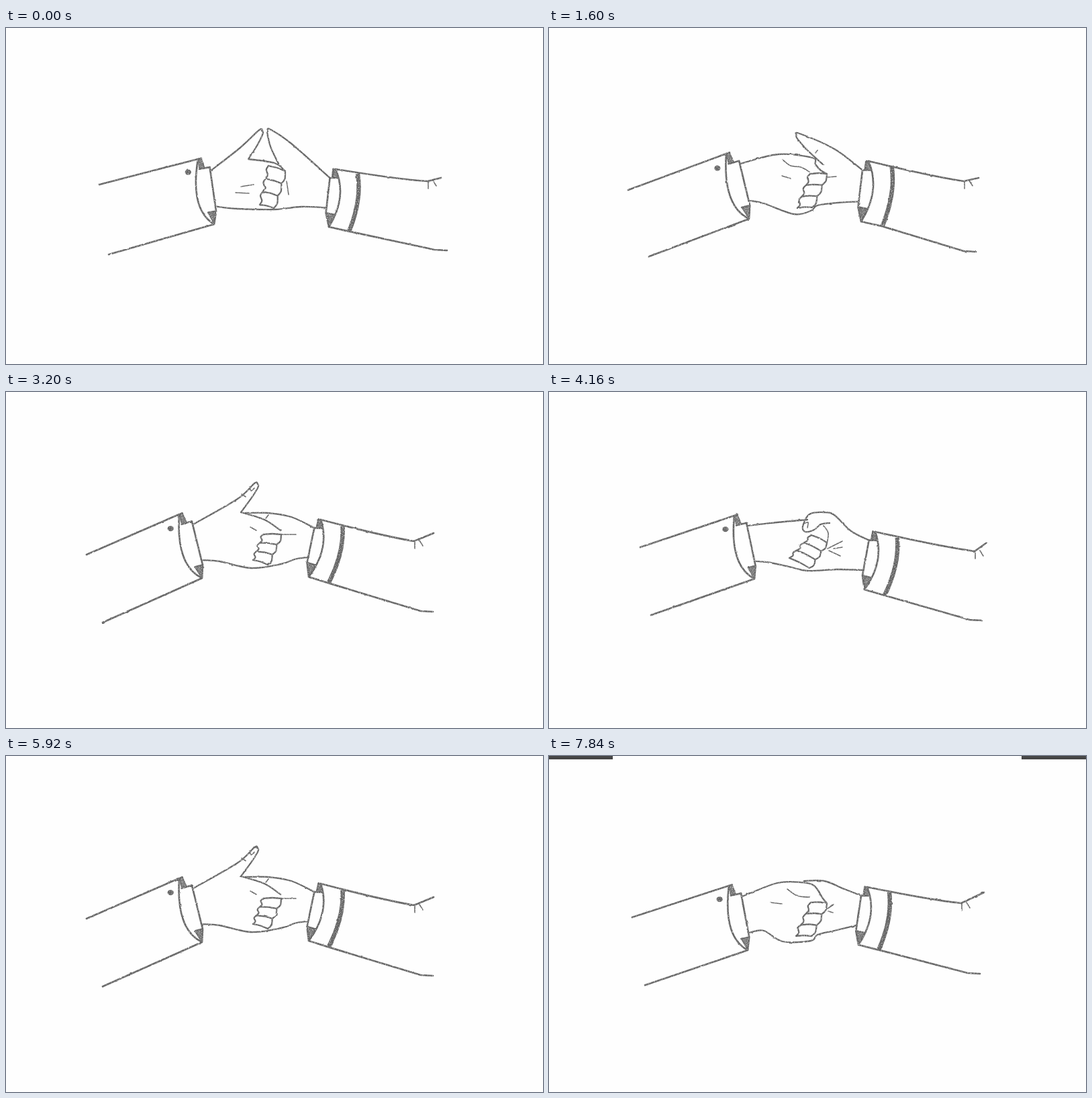
An HTML page for the animation above (8 s loop, 800 px wide and 500 px high).

```html
<!DOCTYPE html>
<html lang="en">
<head>
<meta charset="utf-8">
<title>Thumb wrestling</title>
<style>
  html, body { margin: 0; width: 100%; height: 100%; overflow: hidden; background: #fefefe; }
  svg { display: block; width: 100vw; height: 100vh; }
  path { fill: none; stroke: #666; stroke-linecap: round; stroke-linejoin: round; }
  #arms { stroke-width: 2.7; }
  #hands { stroke-width: 2.3; }
  #fine { stroke-width: 1.6; }
  #band { stroke-width: 6.5; stroke-linecap: butt; }
  #shade { fill: #7a7a7a; stroke-width: 1.4; }
  #button { fill: #666; }
  #bars { fill: #464646; animation: bars 8s step-end infinite; }
  @keyframes bars { 0% { visibility: hidden } 98% { visibility: visible } 100% { visibility: hidden } }
</style>
</head>
<body>
<svg viewBox="0 0 800 500">
  <filter id="pencil" filterUnits="userSpaceOnUse" x="0" y="0" width="800" height="500" color-interpolation-filters="sRGB">
    <feTurbulence id="rough" type="fractalNoise" baseFrequency=".12" numOctaves="2" result="n"/>
    <feDisplacementMap in="SourceGraphic" in2="n" scale="2" xChannelSelector="R" yChannelSelector="G"/>
    <feGaussianBlur stdDeviation=".45" result="line"/>
    <feTurbulence type="fractalNoise" baseFrequency=".6" numOctaves="2"/>
    <feColorMatrix values="0 0 0 0 0  0 0 0 0 0  0 0 0 0 0  0 0 0 2 0" result="grain"/>
    <feComposite in="line" in2="grain" operator="in"/>
  </filter>
  <g filter="url(#pencil)">
    <path id="shade"/>
    <path id="band"/>
    <path id="arms"/>
    <path id="hands"/>
    <path id="fine"/>
    <ellipse id="button" rx="4.6" ry="4"/>
  </g>
  <g id="bars"><rect width="95" height="5"/><rect x="704" width="96" height="5"/></g>
</svg>
<script>
const STEP = 160, COUNT = 50;
const $ = id => document.getElementById(id);
const points = s => s.split(' ').map(p => p.split(',').map(Number));

// arms:  left far, top, low, farLow; right cuff, base, elbow, tip, end
// up:    hands whose thumb is raised; their points are knuckle, tip, web, then the index finger
// fist:  corners of the folded fingers
const pose = (up, arms, left, right, palm, fist, marks) => ({
  up, arms: points(arms), left: points(left), right: points(right),
  palm: points(palm), fist: points(fist), marks: marks.split('/').map(points)
});

const POSES = {
  level: pose('LR', '139,233 286,195 310,292 153,337 491,210 481,296 628,228 648,223 657,331',
    '349,178 377,152 361,195 400,201 416,213', '425,172 394,151 406,202',
    '345,269 400,270 440,266', '391,205 416,213 399,268 378,263',
    '350,236 369,233/342,245 362,246/418,228 421,248'),
  duck: pose('R', '118,241 264,187 298,284 149,340 476,198 465,288 618,228 640,223 636,333',
    '341,188 392,193 397,203 405,212 414,217', '425,180 373,157 408,203',
    '320,261 365,277 390,272 400,264 430,260', '389,217 414,217 392,267 370,268',
    '348,196 360,205 375,207 388,214/347,220 360,224/415,222 428,221/397,186 400,182'),
  lure: pose('L', '120,242 258,182 292,277 144,343 469,190 451,275 608,222 637,210 636,327',
    '345,159 370,136 350,179 385,190 409,206', '357,180 390,180 425,186',
    '318,252 365,262 410,256 430,249', '383,212 410,212 390,257 368,250',
    '364,201 373,206/363,141 365,147 370,143/351,152 357,156/409,212 432,212/391,183 387,188'),
  pin: pose('', '136,231 276,184 306,278 152,332 486,208 470,294 634,237 651,225 645,340',
    '340,194 385,190', '418,195 405,197 395,205 382,208 378,200 388,182 410,179 425,183 450,207',
    '330,254 362,261 385,266 430,264', '391,213 414,224 388,262 358,247',
    '380,196 386,194 385,202/409,199 416,210 414,226/415,233 437,222/424,233 437,231/417,236 434,244'),
  spread: pose('LR', '113,233 255,174 290,265 131,337 480,185 458,269 615,226 645,211 626,331',
    '325,160 342,123 344,167 393,181 405,192', '425,165 380,137 406,190',
    '320,241 378,248 410,243', '370,192 404,200 379,247 358,234',
    '340,128 339,135 343,135/306,227 316,232/389,158 394,154/402,203 420,202/410,186 425,202'),
  lift: pose('R', '123,233 261,164 302,260 166,325 479,182 458,264 610,223 639,217 643,336',
    '325,170 362,162 385,166 405,178 407,189', '425,150 400,121 413,188',
    '340,232 380,238 415,237', '371,177 406,191 381,237 350,221',
    '410,162 395,170/437,193 449,190/413,188 424,203/425,204 432,210/431,205 444,207'),
  clasp: pose('', '124,240 268,193 296,289 143,341 474,195 461,281 614,219 648,203 642,324',
    '340,189 375,188 395,193 408,212 414,219', '380,186 410,186 440,198',
    '320,260 348,276 390,275 400,266 425,260', '390,218 414,219 391,268 368,268',
    '355,198 370,208 388,210/330,218 347,220/415,227 424,221/416,231 423,233')
};

// step at which each pose is struck
const KEYS = [[0, 'level'], [4, 'pin'], [7, 'spread'], [10, 'duck'], [13, 'spread'], [16, 'lift'], [20, 'lure'],
  [23, 'level'], [26, 'pin'], [31, 'spread'], [34, 'duck'], [37, 'lure'], [42, 'lift'], [45, 'lure'],
  [49, 'clasp'], [50, 'level']];

const mix = (a, b, u) => [a[0] + (b[0] - a[0]) * u, a[1] + (b[1] - a[1]) * u];
const add = (p, x, y) => [p[0] + x, p[1] + y];
const fmt = p => p.map(v => v.toFixed(1)).join();
const poly = pts => 'M' + pts.map(fmt).join('L');
const quad = (a, c, b) => `M${fmt(a)}Q${fmt(c)} ${fmt(b)}`;

// Catmull-Rom curve through the points
function curve(pts) {
  let d = 'M' + fmt(pts[0]);
  for (let i = 0; i < pts.length - 1; i++) {
    const a = pts[i - 1] || pts[i], b = pts[i], c = pts[i + 1], e = pts[i + 2] || c;
    d += `C${fmt(add(b, (c[0] - a[0]) / 6, (c[1] - a[1]) / 6))} ` +
         `${fmt(add(c, (b[0] - e[0]) / 6, (b[1] - e[1]) / 6))} ${fmt(c)}`;
  }
  return d;
}

// point measured along a sleeve opening and outward from it
const frame = (a, b) => (along, out) => {
  const x = b[0] - a[0], y = b[1] - a[1];
  return [a[0] + along * x - out * y, a[1] + along * y + out * x];
};

// sleeve openings and shirt cuffs follow from the key points of both arms
function rig([far, top, low, farLow, cuff, base, elbow, tip, end]) {
  const l = frame(top, low), r = frame(cuff, base);
  return {
    far, top, low, farLow, cuff, base, elbow, tip, end, l, r,
    shirtL: [l(.15, .015), l(.16, -.142), l(.82, -.075), l(.81, .045)],
    shirtR: [r(.14, -.06), r(.16, .08), r(.77, .078), r(.78, -.07)]
  };
}

const wrists = ({ shirtL, shirtR }) => [mix(shirtL[1], shirtL[2], .5), mix(shirtR[1], shirtR[2], .5)];

// turns, scales and moves the hands so that they stay on both wrists
function follow([p, q], [P, Q]) {
  const x = q[0] - p[0], y = q[1] - p[1], X = Q[0] - P[0], Y = Q[1] - P[1], n = x * x + y * y;
  const c = (X * x + Y * y) / n, s = (Y * x - X * y) / n;
  return ([a, b]) => {
    const u = a - p[0], v = b - p[1];
    return [P[0] + u * c - v * s, P[1] + u * s + v * c];
  };
}

function thumb(base, [knuckle, tip, web, ...finger]) {
  const len = Math.hypot(tip[0] - knuckle[0], tip[1] - knuckle[1]);
  const dx = (tip[0] - knuckle[0]) / len, dy = (tip[1] - knuckle[1]) / len;
  const side = Math.sign(dx * (web[1] - tip[1]) - dy * (web[0] - tip[0])) * 8;
  const inner = add(tip, -dy * side, dx * side);
  const pad = add(mix(inner, web, .5), dx * 4, dy * 4);
  const end = add(mix(tip, inner, .5), dx * 3, dy * 3);
  return [[base, knuckle, tip, end, inner, pad, web], [web, ...finger]];
}

// three folded fingers stacked between knuckles and tips
function fist([topL, topR, lowR, lowL]) {
  const left = i => mix(topL, lowL, i / 3), right = i => mix(topR, lowR, i / 3);
  const out = [];
  for (let i = 0; i <= 3; i++) {
    const l = left(i), r = right(i);
    out.push([l, add(mix(l, r, .5), 0, -1), r]);
    if (i === 3) break;
    out.push([r, add(mix(r, right(i + 1), .55), 2.5, 1.5), right(i + 1)]);
    out.push([l, add(mix(l, left(i + 1), .3), -2, 0), add(mix(l, left(i + 1), .7), 2, 0), left(i + 1)]);
  }
  return out;
}

function drawArms(k) {
  const { far, top, low, farLow, cuff, base, elbow, tip, end, l, r, shirtL, shirtR } = k;
  const [s1, s2, s3, s4] = shirtL, [t2, t1, t4, t3] = shirtR;
  const fold = l(0, -.05), bend = add(end, -18, -1);
  $('arms').setAttribute('d', [
    poly([far, top, fold]), quad(top, l(.7, .3), low), poly([farLow, low, s3]), poly(shirtL),
    quad(cuff, add(mix(cuff, elbow, .7), 0, 3), elbow), poly([elbow, tip]),
    quad(cuff, r(.45, -.26), base), poly([base, r(1.035, -.355), bend, end]),
    poly(shirtR), poly([r(0, .04), r(.14, .04)]), poly([t4, base])
  ].join(''));
  $('band').setAttribute('d', quad(r(.03, -.387), r(.47, -.51), r(1.035, -.355)));
  $('shade').setAttribute('d', [
    [top, fold, mix(s1, s2, .5), s1],
    [s4, s3, low],
    [r(0, .04), cuff, t2, r(.14, .04)],
    [mix(t4, t3, .2), t3, base]
  ].map(p => poly(p) + 'Z').join(''));
  const [x, y] = l(.155, .19);
  $('button').setAttribute('cx', x);
  $('button').setAttribute('cy', y);
}

function drawHands(p, now, sway) {
  const own = rig(p.arms), place = follow(wrists(own), wrists(now));
  const baseL = add(own.shirtL[1], 3, 4), baseR = own.shirtR[1];
  const line = Math.min(baseL[1], baseR[1]) - 12;
  const lean = ([x, y]) => place([x + sway * Math.max(0, line - y), y]);
  const draw = (id, list) => $(id).setAttribute('d', list.map(s => curve(s.map(lean))).join(''));
  draw('hands', [
    ...(p.up.includes('L') ? thumb(baseL, p.left) : [[baseL, ...p.left]]),
    ...(p.up.includes('R') ? thumb(baseR, p.right) : [[...p.right, baseR]]),
    [add(own.shirtL[2], 1, -7), ...p.palm, add(own.shirtR[2], 0, -8)],
    ...fist(p.fist)
  ]);
  const e = own.elbow;
  draw('fine', [...p.marks, [add(e, 1, 1), add(e, 1, 11)], [add(e, 8, -1), add(e, 13, 7)]]);
}

function draw(step) {
  const i = KEYS.findIndex(k => k[0] > step) - 1;
  const [t0, a] = KEYS[i], [t1, b] = KEYS[i + 1];
  const u = (step - t0) / (t1 - t0), ease = u * u * (3 - 2 * u);
  const from = POSES[a], to = POSES[b];
  const now = rig(from.arms.map((p, j) => mix(p, to.arms[j], ease)));
  drawArms(now);
  drawHands(u < .5 ? from : to, now, .3 * Math.sin(2 * Math.PI * u));
  $('rough').setAttribute('seed', step % 5);
}

let last = -1;
function tick() {
  const step = Math.floor(performance.now() / STEP) % COUNT;
  if (step !== last) draw(last = step);
  requestAnimationFrame(tick);
}
tick();
</script>
</body>
</html>
```
